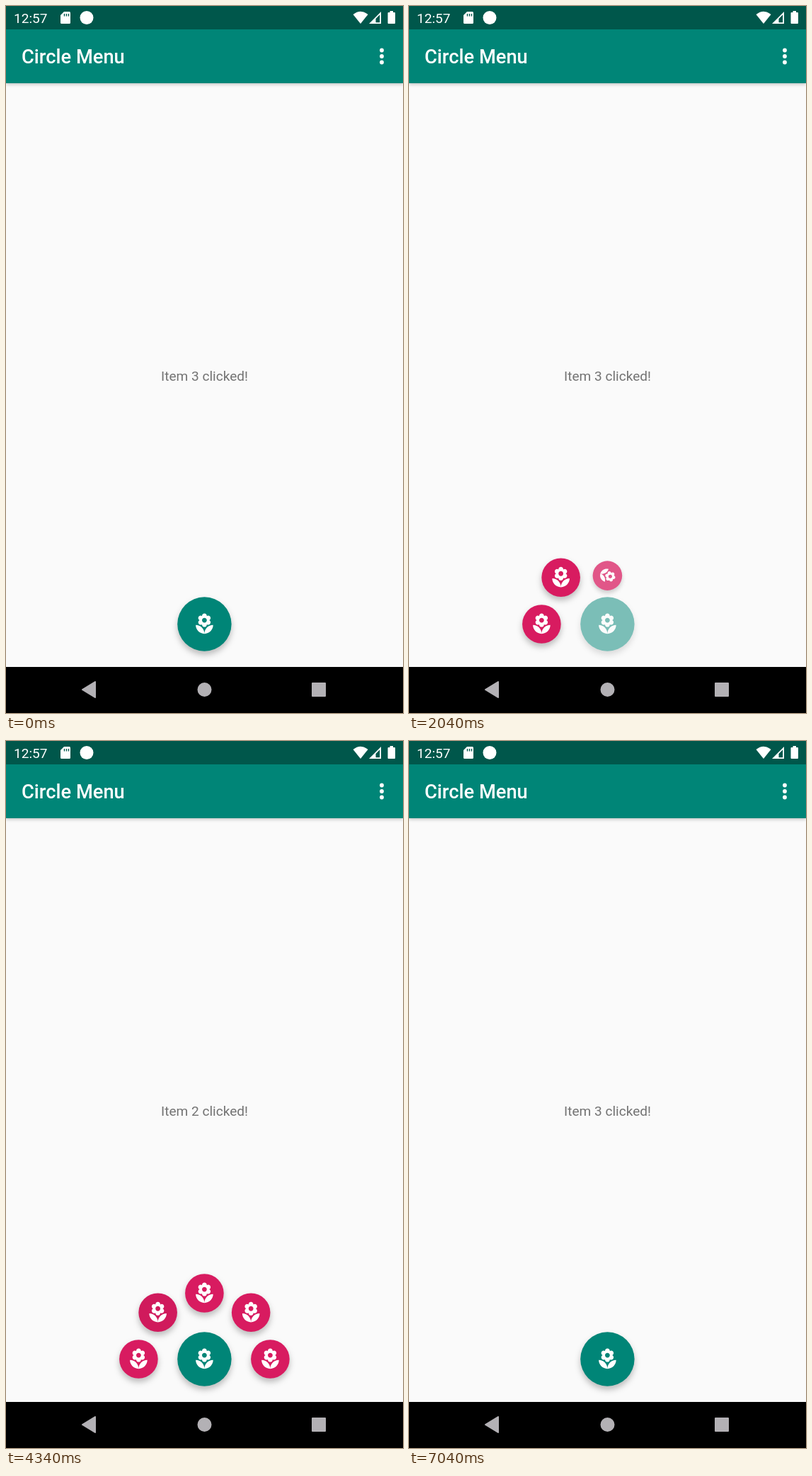
Recreate the animation shown at these times as an HTML page. Size 561 by 998 pixels, loop 7140 ms.

```html
<!DOCTYPE html>
<html lang="en">
<head>
<meta charset="utf-8">
<title>Circle Menu</title>
<style>
  html, body { margin: 0; width: 100%; height: 100%; overflow: hidden; background: #fafafa; }
  svg { display: block; width: 561px; height: 998px; font-family: Roboto, sans-serif; }
  .bar { filter: drop-shadow(0 2px 2px rgba(0, 0, 0, .2)); }
  .button { filter: drop-shadow(0 5px 4px rgba(0, 0, 0, .25)); }
</style>
</head>
<body>
<svg viewBox="0 0 561 998">
  <defs>
    <path id="flower" fill="#fff" transform="scale(1.364) translate(-12 -12)" d="M12 22c4.97 0 9-4.03 9-9-4.97 0-9 4.03-9 9zM5.6 10.25c0 1.38 1.12 2.5 2.5 2.5.53 0 1.01-.16 1.42-.44l-.02.19c0 1.38 1.12 2.5 2.5 2.5s2.5-1.12 2.5-2.5l-.02-.19c.4.28.89.44 1.42.44 1.38 0 2.5-1.12 2.5-2.5 0-1-.59-1.85-1.43-2.25.84-.4 1.43-1.25 1.43-2.25 0-1.38-1.12-2.5-2.5-2.5-.53 0-1.01.16-1.42.44l.02-.19C14.5 2.12 13.38 1 12 1S9.5 2.12 9.5 3.5l.02.19c-.4-.28-.89-.44-1.42-.44-1.38 0-2.5 1.12-2.5 2.5 0 1 .59 1.85 1.43 2.25-.84.4-1.43 1.25-1.43 2.25zM12 5.5c1.38 0 2.5 1.12 2.5 2.5s-1.12 2.5-2.5 2.5S9.5 9.38 9.5 8s1.12-2.5 2.5-2.5zM3 13c0 4.97 4.03 9 9 9 0-4.97-4.03-9-9-9z"/>
  </defs>
  <rect width="561" height="998" fill="#fafafa"/>
  <rect class="bar" width="561" height="109" fill="#008577"/>
  <rect width="561" height="33" fill="#00574b"/>

  <g fill="#fff">
    <text x="11" y="24" font-size="19.1">12:57</text>
    <path d="M82 8h7.500q1.500 0 1.500 1.500v14q0 1.500-1.500 1.500h-11q-1.500 0-1.500-1.500v-10.500z"/>
    <path d="M82.500 11v3.500m3-3.500v3.500m3-3.500v3.500" stroke="#00574b" stroke-width="1.400"/>
    <circle cx="114" cy="16.500" r="9.500"/>
    <path d="M490.500 12q10.500-8.500 21 0l-10.500 13z"/>
    <path d="M530 8v17h-17zm-1.800 4.200l-5.700 5.700v5.400h5.700z" fill-rule="evenodd"/>
    <path d="M542.500 9v-2h4.500v2h2q1 0 1 1v14q0 1-1 1h-8.500q-1 0-1-1v-14q0-1 1-1z"/>
    <text x="22" y="81" font-size="27.3" font-weight="500">Circle Menu</text>
    <circle cx="531" cy="62.500" r="2.900"/>
    <circle cx="531" cy="71" r="2.900"/>
    <circle cx="531" cy="79.500" r="2.900"/>
  </g>

  <text id="message" x="280.500" y="528.500" font-size="19.100" text-anchor="middle" fill="#737373"></text>
  <g id="menu"></g>

  <rect y="933" width="561" height="65" fill="#000"/>
  <g fill="#b3b1b5" stroke="#b3b1b5" stroke-width="2" stroke-linejoin="round">
    <path d="M108 965l18-11v22z"/>
    <circle cx="280.500" cy="965" r="9"/>
    <rect x="433" y="956" width="18" height="18"/>
  </g>
</svg>
<script>
const LOOP = 7140, OPEN_AT = 1882, CLOSE_AT = 5765, DURATION = 300;
const CLICKS = [3390, 4170, 4950];
const COUNT = 5, RADIUS = 93, CENTER = [280.4, 872.5];

const menu = document.getElementById('menu');
const message = document.getElementById('message');
const clamp = x => Math.min(1, Math.max(0, x));
const ease = x => .5 - Math.cos(Math.PI * clamp(x)) / 2;

function addButton(radius, color) {
  const group = document.createElementNS('http://www.w3.org/2000/svg', 'g');
  group.innerHTML = `<circle class="button" r="${radius}" fill="${color}"/>
    <circle r="${radius}" opacity="0"/><g><use href="#flower"/></g>`;
  menu.append(group);
  const [, press, icon] = group.children;
  return { group, press, icon };
}

const items = Array.from({ length: COUNT }, () => addButton(27.3, '#d81b60'));
const main = addButton(38.2, '#008577');
main.group.setAttribute('transform', `translate(${CENTER})`);

// Rises while the finger is down, fades after release.
const pressure = dt => dt < 0 ? clamp(1 + dt / 100) : clamp(1 - dt / 250);

function draw(time) {
  const progress = ease((time - OPEN_AT) / DURATION) - ease((time - CLOSE_AT) / DURATION);
  main.group.setAttribute('opacity', 1 - .5 * Math.sin(Math.PI * progress));

  items.forEach(({ group, press, icon }, i) => {
    const t = clamp(progress * COUNT - i);
    const angle = Math.PI * (1 + i / (COUNT - 1));
    const x = CENTER[0] + Math.cos(angle) * RADIUS * t;
    const y = CENTER[1] + Math.sin(angle) * RADIUS * t;
    group.setAttribute('transform', `translate(${x} ${y}) scale(${.1 + .9 * t})`);
    group.setAttribute('opacity', t);
    icon.setAttribute('transform', `rotate(${400 * (1 - t)})`);
    press.setAttribute('opacity', i in CLICKS ? .12 * pressure(time - CLICKS[i]) : 0);
  });

  const clicked = CLICKS.filter(at => at <= time).length || CLICKS.length;
  message.textContent = `Item ${clicked} clicked!`;
}

const start = performance.now();
(function frame() {
  draw((performance.now() - start) % LOOP);
  requestAnimationFrame(frame);
})();
</script>
</body>
</html>
```
